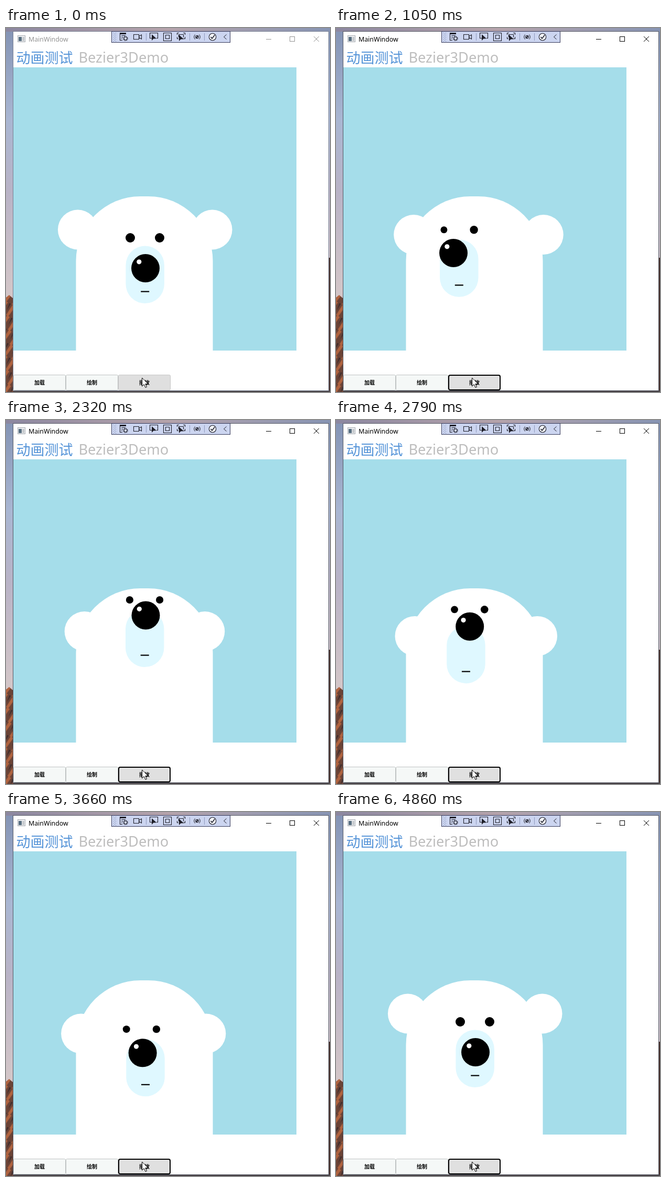
Animation, 618 px wide and 694 px high, one loop 5060 ms. Source, as an HTML page:

```html
<!DOCTYPE html>
<html lang="zh-CN">
<head>
<meta charset="utf-8">
<title>MainWindow</title>
<style>
  html, body { margin: 0; width: 100%; height: 100%; overflow: hidden; background: #fff; }
  svg { display: block; width: 618px; height: 694px; }
  text { font-family: "Noto Sans", sans-serif; }
  .cjk { font-family: "Noto Sans CJK SC", "Noto Sans CJK", sans-serif; }
  .label { font-size: 10px; font-weight: 700; text-anchor: middle; }
  .button { fill: #f5f8f7; stroke: #bfc3c3; }
  #chrome { color: #949494; }
  #chrome.active { color: #000; }
  #chrome text { fill: currentColor; font-size: 12.35px; }
  #chrome path { stroke: currentColor; fill: none; }
  #frame { stroke: #777f92; }
  .active #frame { stroke: #535763; }
  #focus { display: none; }
  .active #focus { display: block; }
  #tools { fill: none; stroke: #1e1e28; stroke-width: 1.1; }
  #tools .solid { fill: #1e1e28; stroke: none; }
  #tools .split { stroke: #8f9abf; stroke-width: 1; }
</style>
</head>
<body>
<svg viewBox="0 0 618 694">
  <defs>
    <linearGradient id="sky" x2="0" y2="1">
      <stop offset="0" stop-color="#8393b4"/>
      <stop offset=".25" stop-color="#a9b6d2"/>
      <stop offset=".45" stop-color="#b9b3c6"/>
      <stop offset=".73" stop-color="#d3c6c8"/>
    </linearGradient>
    <linearGradient id="dusk">
      <stop offset="0" stop-color="#8c87a0"/>
      <stop offset=".5" stop-color="#b5a3ab"/>
      <stop offset="1" stop-color="#8794b3"/>
    </linearGradient>
    <pattern id="rock" width="16" height="23" patternUnits="userSpaceOnUse" patternTransform="rotate(28)">
      <rect width="16" height="23" fill="#6b4336"/>
      <path d="M3 0L9 0L6 23H1Z" fill="#b0633f"/>
      <path d="M12 0H15L14 15Z" fill="#3c2b2c"/>
    </pattern>
    <clipPath id="stage"><rect x="14" y="75" width="540" height="540"/></clipPath>
    <path id="pointer" d="M0 0V12L3.3 8.5L9 8.2Z"/>
  </defs>

  <rect width="618" height="694" fill="url(#sky)"/>
  <rect width="618" height="7" fill="url(#dusk)"/>
  <path d="M0 514L6 509L14 516V694H0Z" fill="url(#rock)"/>
  <rect x="615" y="438" width="3" height="256" fill="#49332f"/>
  <rect x="14" y="691" width="604" height="3" fill="#4b4548"/>

  <g id="chrome">
    <rect id="frame" x="13.5" y="6.5" width="602" height="685" fill="#fff"/>
    <g shape-rendering="crispEdges">
      <rect x="22.5" y="14.5" width="14" height="12" fill="#f2f3f5" stroke="#a4a8ae"/>
      <rect x="24" y="17" width="6" height="8" fill="#566e80"/>
      <rect x="31" y="17" width="4" height="8" fill="#c5c9cd"/>
    </g>
    <text x="43" y="25.5">MainWindow</text>
    <path d="M496 21.5H506M541.5 16.5H550.5V25.5H541.5Z" shape-rendering="crispEdges"/>
    <path d="M587 16L597 26M597 16L587 26"/>
    <rect class="button" x="14.5" y="661.5" width="99" height="29" rx="2"/>
    <rect class="button" x="114.5" y="661.5" width="99" height="29" rx="2"/>
    <rect x="214.5" y="661.5" width="99" height="29" rx="2" fill="#dfdfdf" stroke="#c6c6c6"/>
    <rect id="focus" x="215" y="662" width="98" height="28" rx="3" fill="#e0e0e0" stroke="#000" stroke-width="2"/>
  </g>

  <text class="cjk label" x="64" y="680">加载</text>
  <text class="cjk label" x="164" y="680">绘制</text>
  <text class="cjk label" x="264" y="680">播放</text>
  <text class="cjk" x="19.5" y="66.5" font-size="27" fill="#5594d8">动画测试</text>
  <text x="138.4" y="66" font-size="27.2" fill="#bdbdbd">Bezier3Demo</text>

  <g id="tools">
    <rect x="201.5" y="6.5" width="226" height="21" fill="#ccd5f0" stroke="#35395a" stroke-width="1"/>
    <path d="M205.5 9V26M209.5 9V26M207.5 11V26" stroke="#7380a8" stroke-dasharray="1 3"/>
    <path d="M217.5 10V23.5H222M220 14.5H228M220 17.5H223M220 20.5H222"/>
    <path class="solid" d="M217 9H229V12H217Z"/>
    <circle cx="228" cy="20" r="3"/>
    <circle cx="228" cy="20" r="4.3" stroke-dasharray="1.6 1.78"/>
    <path d="M243.5 12.5H253.5V21.5H243.5ZM253.5 16L258.5 13V21L253.5 18"/>
    <path class="split" d="M267.5 10V24M350.5 10V24M378.5 10V24"/>
    <path d="M278 19.5H274.5V9.5H289.5V19.5H287"/>
    <use class="solid" href="#pointer" x="278" y="12"/>
    <path d="M300.5 9.5H315.5V24.5H300.5ZM304.5 13.5H311.5V20.5H304.5Z"/>
    <path d="M326.5 13V9.5H330M338 9.5H341.5V13M326.5 17V20.5H329M341.5 17V20.5H338M329.5 18V12.5H338.5V18"/>
    <use class="solid" href="#pointer" x="330" y="13"/>
    <path d="M360.5 12.5Q357 17 360.5 21.5M368.5 12.5Q372 17 368.5 21.5" stroke-width="1"/>
    <circle cx="364.5" cy="17" r="2.8"/>
    <path d="M362.5 19L366.5 15" stroke-width="1.8"/>
    <circle cx="394" cy="17" r="6.7" fill="#f3f5fc"/>
    <path d="M390.5 17L393 20L398 13.5" stroke-width="1.6"/>
    <path d="M420.5 12.5L415.5 17L420.5 21.5" stroke-width="1"/>
  </g>

  <g clip-path="url(#stage)">
    <rect x="14" y="75" width="540" height="540" fill="#a5ddea"/>
    <g fill="#fff">
      <circle id="earL" r="38"/>
      <circle id="earR" r="38"/>
      <rect x="133.5" y="321" width="261" height="420" rx="123"/>
    </g>
    <g id="muzzle">
      <rect x="-36.75" y="-54.75" width="73.5" height="109.5" rx="36.75" fill="#dff8ff"/>
      <rect x="-8" y="31.1" width="16" height="2.2"/>
    </g>
    <circle id="eyeL" r="9"/>
    <circle id="eyeR" r="9"/>
    <g id="nose">
      <circle r="27"/>
      <circle cx="-12.2" cy="-12.2" r="4.6" fill="#fff"/>
    </g>
  </g>

  <path d="M259.5 667V683L263.3 679.5L266 685.5L268.5 684.4L265.9 678.6H271Z" fill="#fff" stroke="#000"/>
</svg>
<script>
  const LOOP = 5060, STEP = 66.8, CLICK = 110;
  const LAG = 60; // eyes and nose trail the rest of the head
  const $ = id => document.getElementById(id);

  // Where the bear looks: shift of face and nose, ears drawn in and down.
  const pose = (face, nose, ears, turn = 1) => [...face, ...nose, ...ears, turn];
  const rest = pose([0, 0], [0, 0], [0, 0], 0);
  const looks = [
    { from: 240, to: 850, pose: pose([-30.5, -12.2], [-42, -29], [4.5, 9.5]) },
    { from: 1040, to: 1540, pose: pose([46, -12], [58, -29.5], [4.5, 9.5]) },
    { from: 1775, to: 2165, pose: pose([-.5, -54], [.5, -85.5], [13.5, 18.5]) },
    { from: 2570, to: 3030, pose: pose([-37.2, 14], [-41.5, -6.5], [9.2, 38]) },
    { from: 3200, to: 4120, pose: pose([40, 14], [50, -6.5], [9.2, 38]), dip: 3.3 },
    { from: 4230, to: 4790, pose: rest }
  ];

  const ease = u => u * u * (3 - 2 * u);

  function headAt(t) {
    let last = rest, head = rest, dip = 0;
    for (const look of looks) {
      if (t < look.from) break;
      const e = ease(Math.min(1, (t - look.from) / (look.to - look.from)));
      head = last.map((v, i) => v + (look.pose[i] - v) * e);
      dip = (look.dip || 0) * Math.sin(Math.PI * e);
      last = look.pose;
    }
    const [x, y, noseX, noseY, squeeze, drop, turn] = head;
    return { x, y: y + dip, noseX, noseY: noseY + 2.5 * dip, squeeze, drop, turn };
  }

  function place(id, x, y) {
    $(id).setAttribute("transform", `translate(${x.toFixed(2)} ${y.toFixed(2)})`);
  }

  function draw(time) {
    const t = time % LOOP;
    const tick = 1050 + Math.floor((t - 1045) / STEP) * STEP;
    const head = headAt(tick), gaze = headAt(tick - LAG);
    const sway = head.turn - .22 * head.x - .1 * head.drop;

    $("chrome").classList.toggle("active", t >= CLICK);
    place("muzzle", 265.2 + head.x, 470.3 + head.y);
    place("nose", 266 + gaze.noseX, 458 + gaze.noseY);
    for (const [side, sign] of [["L", -1], ["R", 1]]) {
      place("ear" + side, 265.2 + sway + sign * (128.3 - head.squeeze), 384.5 + head.drop);
      place("eye" + side, 265 + gaze.x + sign * (28 + .6 * gaze.turn), 400 + gaze.y - 3 * gaze.turn);
      // The eye on the far side looks smaller.
      $("eye" + side).setAttribute("r", (9 - 1.9 * gaze.turn - sign * .02 * gaze.x).toFixed(2));
    }
  }

  const begin = performance.now();
  function loop() {
    draw(performance.now() - begin);
    requestAnimationFrame(loop);
  }
  loop();
</script>
</body>
</html>
```
